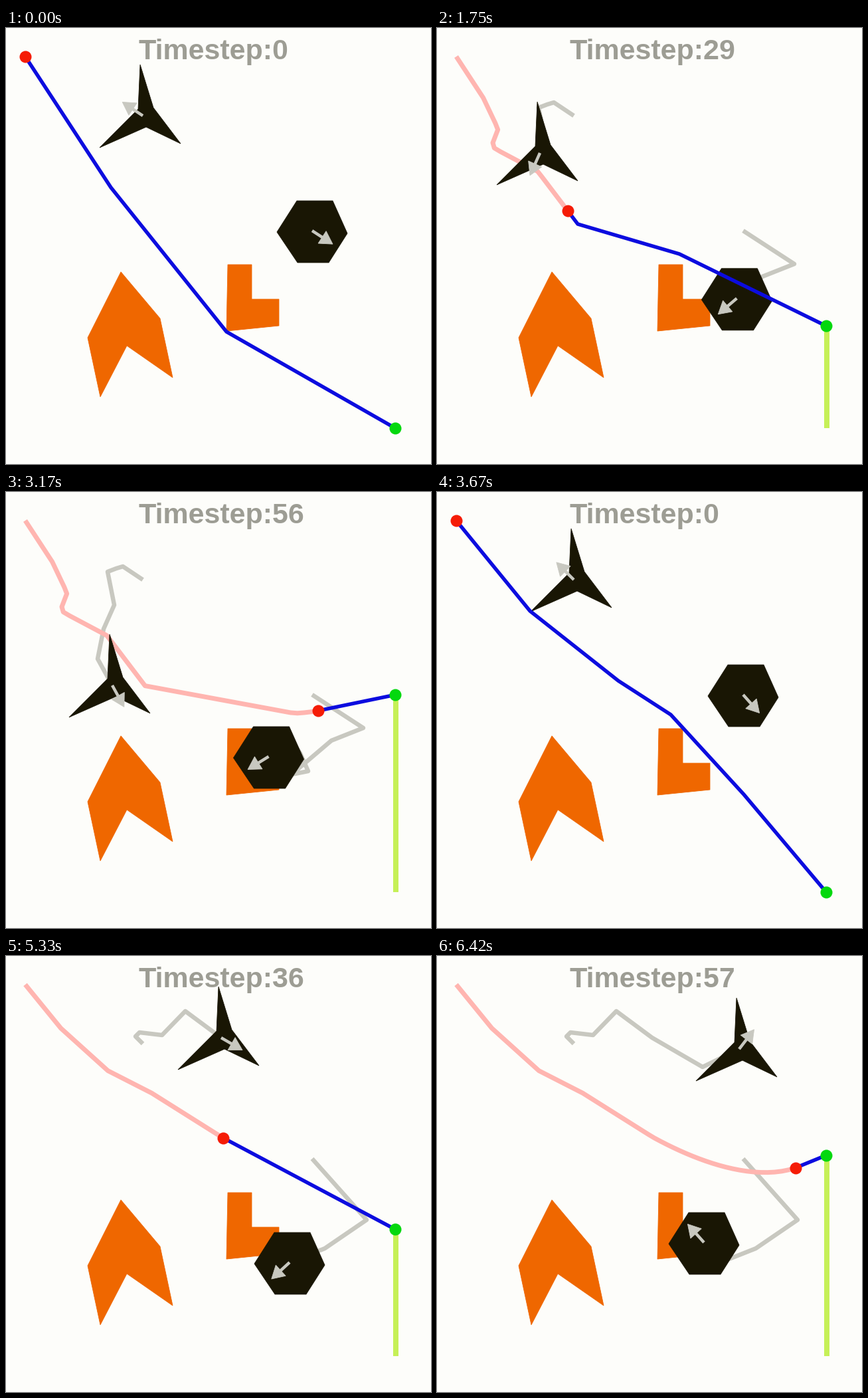
Animation of 640 by 656 pixels, one loop 6.51 s. Source, as a matplotlib script:

```python
import numpy as np
import matplotlib.pyplot as plt
from matplotlib.animation import FuncAnimation
from matplotlib.patches import Polygon

W, H, DPI = 640, 656, 100
PX = 72 / DPI
LOOP, TICK = 6510, 30          # ms
REDRAW = 1000 / 12             # the picture changes twelve times a second
SHOTS, RESTART = 78, 44        # redraws per loop, redraw that opens run two

BG, INK, ORANGE = "#fdfdfa", "#191604", "#ef6700"
RED, GREEN, BLUE = "#f51c06", "#04d80e", "#0c0cdf"
PINK, LIME, GREY, TEXT = "#ffb5b0", "#c6f058", "#c8c8c0", "#9d9d94"

ROBOT_START, ROBOT_SPEED = (29, 43), 10.6
GOAL_START, GOAL_SPEED = (586, 602), 5.3

CHEVRON = [(173, 367), (232, 437), (251, 526), (182, 478), (142, 555), (123, 466)]
ELBOW = [(334, 356), (370, 356), (370, 408), (411, 408), (411, 448), (332, 456)]

# Outlines relative to the point each obstacle is steered from.
STAR = [(-4, -77), (16, -12), (57, 42), (5, 17), (-65, 48), (-7, -10)]
HEXAGON = [(-23, -45), (31, -45), (53, 4), (25, 48), (-22, 48), (-53, 2)]

# Obstacles turn at (timestep, x, y); the robot replans at a timestep
# and heads for the via points left, then straight for the goal.
RUN_ONE = dict(
    star=[(0, 206, 132), (8, 176, 112), (13, 166, 115), (17, 153, 120), (26, 163, 170),
          (32, 147, 206), (45, 138, 251), (64, 176, 320)],
    hexa=[(0, 461, 305), (13, 538, 355), (20, 490, 374), (34, 430, 425), (40, 455, 420),
          (45, 443, 393), (48, 431, 376), (64, 360, 420)],
    plans={0: [(158, 240), (332, 457)],
           7: [(92, 152), (82, 178), (297, 306), (365, 352)],
           16: [(152, 216), (212, 295), (365, 340)],
           31: [(434, 333)]},
)
RUN_TWO = dict(
    star=[(0, 206, 132), (4, 195, 121), (8, 201, 115), (19, 235, 119), (29, 270, 83),
          (36, 324, 123), (48, 400, 167), (57, 455, 140), (61, 478, 110)],
    hexa=[(0, 461, 305), (14, 543, 397), (24, 480, 440), (36, 427, 461), (38, 415, 472),
          (52, 420, 452), (57, 402, 431), (61, 378, 404)],
    plans={0: [(140, 179), (273, 284), (352, 335), (462, 455)],
           8: [(155, 174), (352, 335), (462, 455)],
           17: [(554, 377)],
           24: [(324, 272)]},
)


def goal_at(t):
    return np.array([GOAL_START[0], GOAL_START[1] - GOAL_SPEED * t])


def chase(plans, steps=66):
    """Robot positions and planned routes at every timestep."""
    pos, track, routes, vias = np.array(ROBOT_START, float), [], [], []
    for t in range(steps):
        vias = list(plans.get(t, vias))
        track.append(pos)
        routes.append([pos, *vias, goal_at(t)])
        left = ROBOT_SPEED
        while left > 1e-6:
            gap = (vias[0] if vias else goal_at(t)) - pos
            dist = np.hypot(*gap)
            hop = min(left, dist)
            pos = pos + gap * hop / max(dist, 1e-6)
            left -= hop
            if hop == dist:
                if not vias:
                    break
                vias.pop(0)
    return np.array(track), routes


def wander(turns, t):
    """Obstacle trail up to timestep t and its heading."""
    turns = np.array(turns, float)
    when, spots = turns[:, 0], turns[:, 1:]
    here = [np.interp(t, when, spots[:, k]) for k in (0, 1)]
    i = min(np.searchsorted(when, t, side="right"), len(when) - 1)
    step = spots[i] - spots[i - 1]
    return np.vstack([spots[when < t], here]), step / np.hypot(*step)


def clock(ms):
    """Run and timestep shown at a moment of the loop."""
    shot = min(int(ms / REDRAW), SHOTS - 1)
    if shot < RESTART:
        return RUN_ONE, max(0, round(13 + 1.6 * (shot - 11)))
    return RUN_TWO, round(np.interp(shot, [44, 55, 64, 77], [0, 19, 36, 57]))


for run in (RUN_ONE, RUN_TWO):
    run["track"], run["routes"] = chase(run["plans"])

fig = plt.figure(figsize=(W / DPI, H / DPI), dpi=DPI, facecolor=BG)
ax = fig.add_axes([0, 0, 1, 1])
ax.set_xlim(0, W)
ax.set_ylim(H, 0)
ax.axis("off")


def stroke(color, px, z):
    return ax.plot([], [], color=color, lw=px * PX, zorder=z,
                   solid_capstyle="butt", solid_joinstyle="round")[0]


def shape(points, color, z):
    return ax.add_patch(Polygon(points, closed=True, fc=color, ec=color,
                                lw=0.8 * PX, zorder=z))


def dot(color):
    return ax.plot([], [], "o", color=color, ms=18 * PX, mew=0, zorder=9)[0]


class Obstacle:
    def __init__(self, outline):
        self.outline = np.array(outline)
        self.trail = stroke(GREY, 6.5, 2)
        self.body = shape(outline, INK, 5)
        self.shaft = stroke(GREY, 4.5, 6)
        self.head = shape(outline, GREY, 6)

    def move(self, turns, t):
        trail, d = wander(turns, t)
        p = trail[-1]
        side = 11 * np.array([-d[1], d[0]])
        neck = p + 18 * d
        self.trail.set_data(*trail.T)
        self.body.set_xy(self.outline + p)
        self.shaft.set_data(*np.array([p, neck + d]).T)
        self.head.set_xy([p + 37 * d, neck + side, neck - side])


shape(CHEVRON, ORANGE, 1)
shape(ELBOW, ORANGE, 1)
star, hexa = Obstacle(STAR), Obstacle(HEXAGON)
robot_trail, goal_trail = stroke(PINK, 7, 3), stroke(LIME, 8, 3)
path = stroke(BLUE, 5.5, 8)
robot, goal = dot(RED), dot(GREEN)
label = ax.text(200, 47, "", color=TEXT, fontsize=43 * PX, family="Liberation Sans",
                weight="bold", va="baseline", zorder=7)


def update(i):
    run, t = clock((i + 1) * TICK - 1)
    star.move(run["star"], t)
    hexa.move(run["hexa"], t)

    track = run["track"][:t + 1]
    gx, gy = goal_at(t)
    robot_trail.set_data(*track.T)
    robot.set_data(*track[-1:].T)
    goal_trail.set_data([gx + 1, gx + 1], [GOAL_START[1], gy])
    goal.set_data([gx], [gy])
    path.set_data(*zip(*run["routes"][t]))
    label.set_text(f"Timestep:{t}")
    return []


anim = FuncAnimation(fig, update, frames=LOOP // TICK, interval=TICK,
                     repeat=True, repeat_delay=0, blit=False)
plt.show()
```
